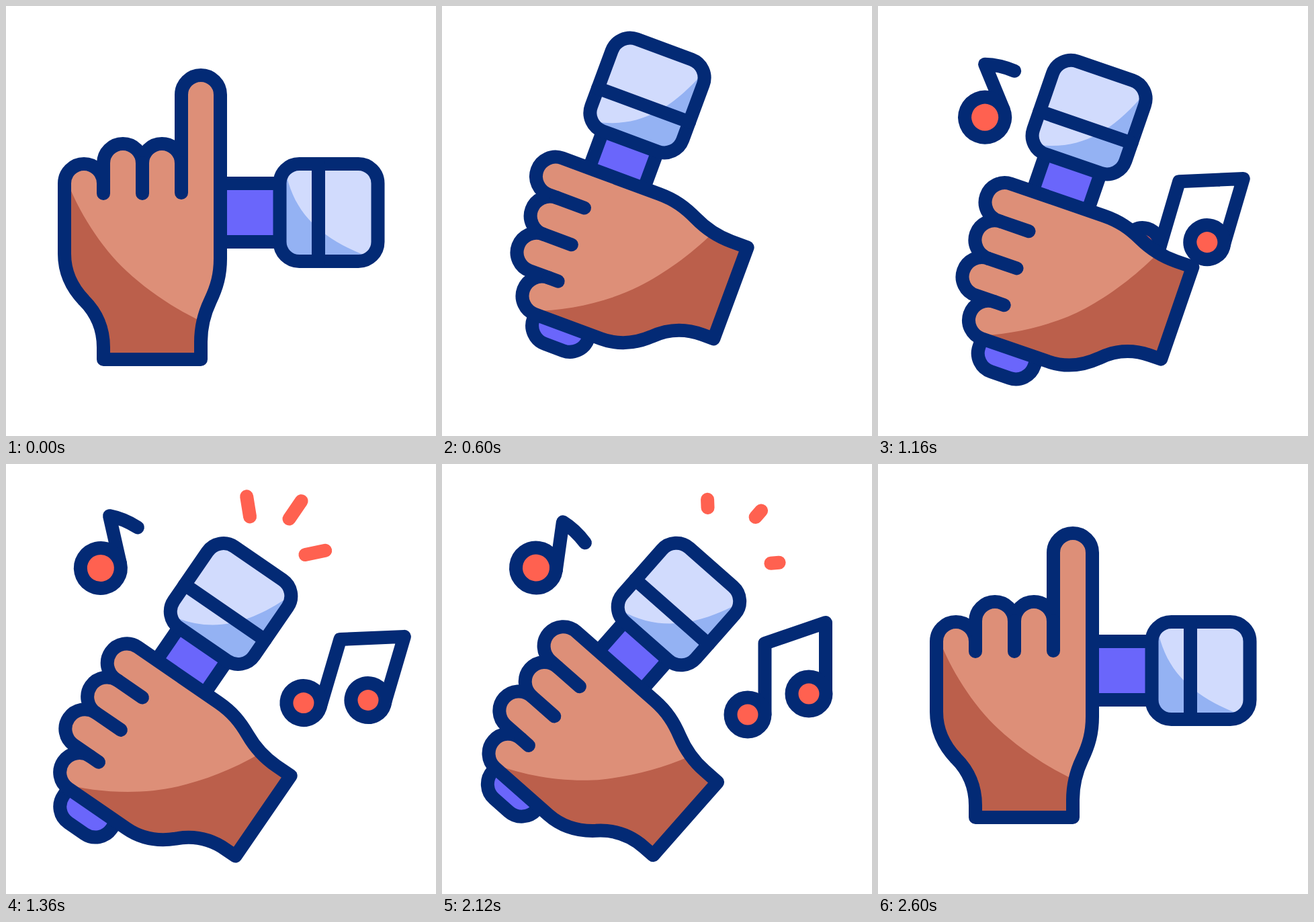
Animation, 640 px wide and 640 px high, one loop 2.8 s. Source, as an HTML page:

```html
<!DOCTYPE html>
<html lang="en">
<head>
<meta charset="utf-8">
<title>Hand and microphone</title>
<style>
  html, body { margin: 0; width: 100%; height: 100%; overflow: hidden; background: #fff; }
  svg { display: block; width: 100%; height: 100%; }
  .ink { stroke: #032a75; stroke-width: 20; stroke-linecap: round; stroke-linejoin: round; fill: none; }
  .skin { fill: #dd8f78; }
  .skin-shade { fill: #bb5f4b; }
  .grip { fill: #6a66fb; }
  .head { fill: #d1dbfd; }
  .head-shade { fill: #94b2f3; }
  .red { fill: #ff6150; }
  .spark { stroke: #ff6150; stroke-width: 20; stroke-linecap: round; }
</style>
</head>
<body>
<svg viewBox="0 0 640 640">
  <g id="single" class="ink">
    <path d="M30 0V-73C46 -66 58 -56 67 -47"/>
    <circle class="red" r="30"/>
  </g>
  <g id="double" class="ink">
    <path d="M-20 15.5V-90.5L70.5 -121.5V-15.5"/>
    <circle class="red" cx="-45.5" cy="15.5" r="25.5"/>
    <circle class="red" cx="45.5" cy="-15.5" r="25.5"/>
  </g>
  <g id="arm">
    <rect id="grip" class="ink grip" y="264" height="87" rx="29"/>
    <g id="mic">
      <path id="sparks" class="spark"/>
      <rect class="head" x="407.5" y="235" width="146" height="145" rx="29"/>
      <path class="head-shade" d="M417 250C430 310 470 345 531 370V380H436a29 29 0 0 1 -29 -29V250Z"/>
      <rect class="ink" x="407.5" y="235" width="146" height="145" rx="29"/>
      <path class="ink" d="M465 235V380"/>
    </g>
    <path id="skin" class="skin"/>
    <path class="skin-shade" d="M87 250C105 302 140 358 180 395C210 423 250 450 290 469V526H145V508C145 482 136 458 116 438C97 418 87 395 87 369Z"/>
    <path id="outline" class="ink"/>
    <path class="ink" d="M145 264V279M203 234V279M261 234V278"/>
  </g>
</svg>
<script>
const LOOP = 2800, STEP = 40;
const el = id => document.getElementById(id);
const lerp = (a, b, p) => a + (b - a) * p;
const ramp = (t, from, to) => Math.min(1, Math.max(0, (t - from) / (to - from)));

function ease(t, from, to) {
  const p = ramp(t, from, to);
  return p < 0.5 ? 4 * p ** 3 : 1 - 4 * (1 - p) ** 3;
}

// Linear interpolation through [time, value] pairs
function track(t, keys) {
  return keys.slice(1).reduce((v, [time, value], i) =>
    t > keys[i][0] ? lerp(keys[i][1], value, ramp(t, keys[i][0], time)) : v, keys[0][1]);
}

function handPath(indexY) {
  const tip = 'a29 29 0 0 1 58 0';
  return `M87 369V264${tip}V234${tip}${tip}V${indexY}${tip}V376` +
    'C319 400 314 418 304 439C294 460 290 478 290 500V526H145V508C145 482 136 458 116 438C97 418 87 395 87 369Z';
}

// Inner and outer ends of the three rays
const RAYS = [[603.5, 257.5, 625.5, 236.5], [634, 307.5, 666, 307.5], [603.5, 357.5, 625.5, 378.5]];

function sparkPath(start, end) {
  if (start >= end) return '';
  return RAYS.map(([x1, y1, x2, y2]) =>
    `M${lerp(x1, x2, start)} ${lerp(y1, y2, start)}L${lerp(x1, x2, end)} ${lerp(y1, y2, end)}`).join('');
}

function drawArm(t) {
  const rise = ease(t, 280, 840), sway = ease(t, 940, 1500), back = ease(t, 1900, 2520);
  const turn = ease(t, 1920, 2600), fold = ease(t, 240, 740) - turn;
  const slide = 30 * (ease(t, 240, 635) - ease(t, 2080, 2500));
  const angle = -76.4 * ease(t, 240, 740) + 22.3 * sway + 54.1 * turn;
  const hop = 10 * Math.sin(Math.PI * ramp(t, 240, 840));
  const x = 203 + 96 * rise - 65.5 * sway - 30.5 * back;
  const y = 360 + 48 * rise + 36 * sway - 84 * back - hop;
  el('arm').setAttribute('transform', `translate(${x} ${y}) rotate(${angle}) translate(-203 -360)`);

  const tail = 110 - 65 * fold;
  el('grip').setAttribute('x', tail);
  el('grip').setAttribute('width', 450 - slide - tail);
  el('mic').setAttribute('transform', `translate(${-slide} 0)`);
  el('sparks').setAttribute('d', sparkPath(ramp(t, 2060, 2160), ramp(t, 1200, 1300)));

  const hand = handPath(132 + 98 * fold);
  el('skin').setAttribute('d', hand);
  el('outline').setAttribute('d', hand);
}

function drawNote(id, t, from, to, power, angle) {
  const out = (1 - (1 - ramp(t, 900, 1470)) ** power) * (1 - ease(t, 2140, 2420));
  const scale = ramp(t, 900, 1060) * (1 - ramp(t, 2200, 2420));
  const note = el(id);
  note.style.display = scale > 0 ? '' : 'none';
  note.setAttribute('transform',
    `translate(${lerp(from[0], to[0], out)} ${lerp(from[1], to[1], out)}) rotate(${angle}) scale(${scale})`);
}

function frame(now) {
  const t = Math.floor(now % LOOP / STEP) * STEP;
  drawArm(t);
  drawNote('single', t, [259, 224], [140, 154.5], 3,
    track(t, [[1160, -22.4], [1640, 0.8], [2120, 8]]));
  const drift = ramp(t, 1640, 2120);
  drawNote('double', t, [308, 354], [498 + 2.5 * drift, 353.5 + 4 * drift], 2,
    track(t, [[1400, 16.4], [1640, 9.7], [1920, 3.6], [2120, 0]]));
}

const begin = performance.now();
function tick() {
  frame(performance.now() - begin);
  requestAnimationFrame(tick);
}
tick();
</script>
</body>
</html>
```
